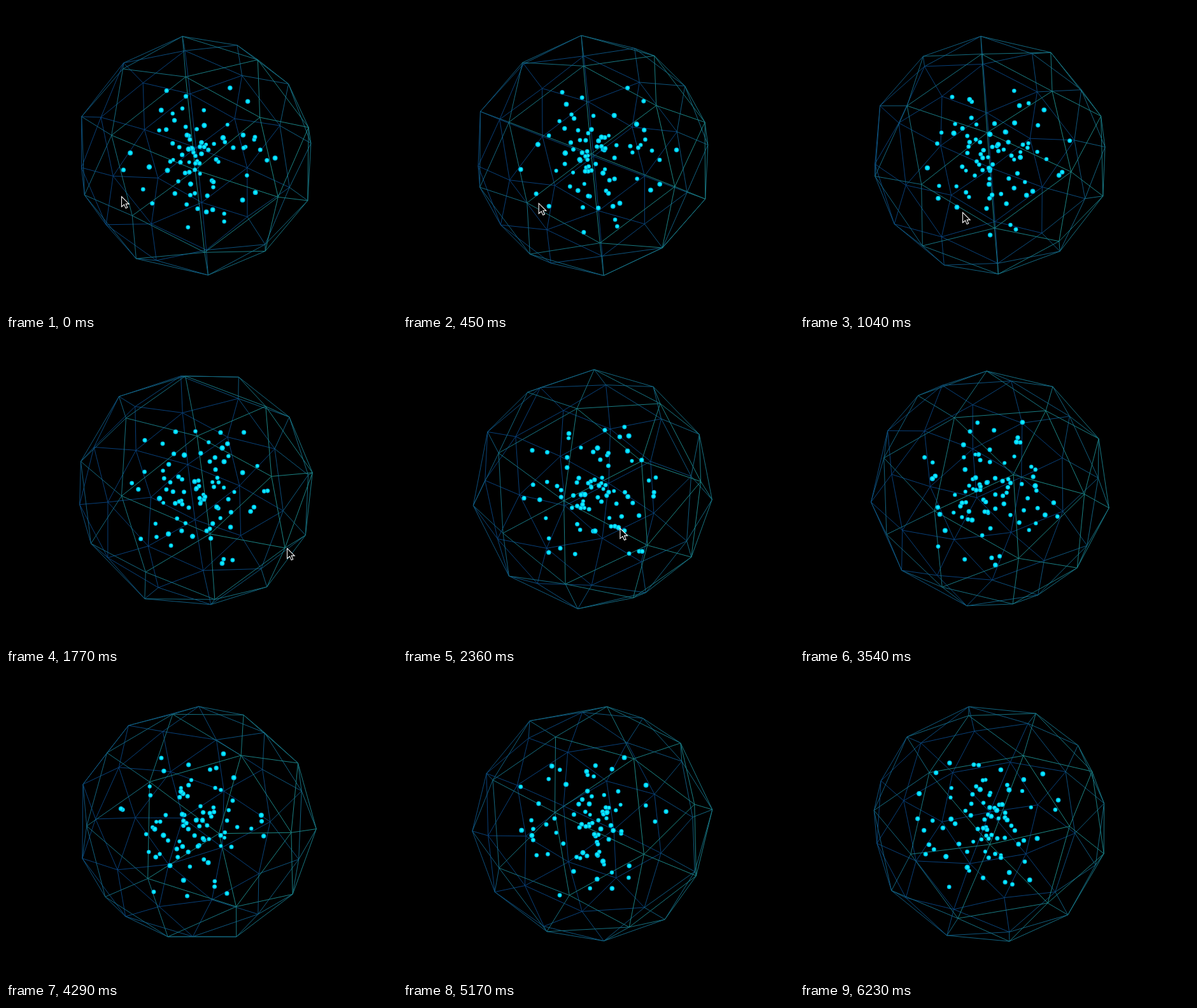
Animation of 614x481 px, one loop 6330 ms. Source, as an HTML page with a canvas:

```html
<!DOCTYPE html>
<html lang="en">
<head>
<meta charset="utf-8">
<title>Wire globe</title>
<style>
  html, body { margin: 0; width: 100%; height: 100%; overflow: hidden; background: #000; }
  canvas { display: block; }
</style>
</head>
<body>
<canvas id="stage" width="614" height="481"></canvas>
<script>
const ctx = document.getElementById('stage').getContext('2d');
const LOOP = 6330, STEP = 147.3, LAST = 42;
const CX = 298, CY = 235, DIST = 3.4, FOCAL = 616;
const PHI = (1 + Math.sqrt(5)) / 2;

// Globe keys: step, yaw, pitch, roll in degrees
const turns = [
  [0, -.2, -5.1, 37.8],
  [7, -.9, 8.1, 36],
  [12, 5.3, -16.1, 39.4],
  [19, -22, 5.1, 17.6],
  [29, -19.2, -20.7, 29.1],
  [35, 19.2, -11.2, 35.2],
  [42, 0, -7.4, 10.1]
];
// Pointer keys: step, x, y
const pointer = [[0, 181, 299], [7, 255, 324], [12, 441, 327], [19, 265, 272]];
const POINTER_END = 22;

const dot = (a, b) => a[0] * b[0] + a[1] * b[1] + a[2] * b[2];
const unit = v => v.map(c => c / Math.hypot(...v));
const mix = (a, b, k) => a.map((c, i) => c + (b[i] - c) * k);
const clamp = k => Math.min(1, Math.max(0, k));

function at(keys, n) {
  let i = 0;
  while (i < keys.length - 2 && n >= keys[i + 1][0]) i++;
  const [a, b] = [keys[i], keys[i + 1]];
  return mix(a, b, clamp((n - a[0]) / (b[0] - a[0]))).slice(1);
}

function swing(a, b, angle) {
  const c = Math.cos(angle), s = Math.sin(angle);
  return [a * c - b * s, a * s + b * c];
}

function rotate([x, y, z], yaw, pitch, roll) {
  [x, y] = swing(x, y, roll);
  [z, y] = swing(z, y, pitch);
  [z, x] = swing(z, x, yaw);
  return [x, y, z];
}

function project([x, y, z]) {
  const k = FOCAL / (DIST - z);
  return [CX + x * k, CY - y * k, k];
}

// Icosahedron split once: 12 corners and 30 edge midpoints
const corners = [];
for (const s of [-1, 1]) for (const q of [-PHI, PHI]) {
  corners.push(unit([0, s, q]), unit([s, q, 0]), unit([q, 0, s]));
}
// The side axis runs along x and the front axis along z
const verts = corners.map(([x, y, z]) => [y, -x, z]);
for (const a of verts.slice()) for (const b of verts.slice(0, 12)) {
  if (a < b && dot(a, b) > .4 && dot(a, b) < .5) verts.push(unit(mix(a, b, .5)));
}
const edges = [];
verts.forEach((a, i) => verts.slice(i + 1).forEach(b => {
  if (dot(a, b) > .8) edges.push([a, b]);
}));

let seed = 20;
function rand() {
  seed = (seed * 16807) % 2147483647;
  return seed / 2147483647;
}
const dots = Array.from({ length: 82 }, () => {
  const z = rand() * 2 - 1, a = rand() * Math.PI * 2;
  const r = .08 + .66 * rand() ** .8, s = Math.sqrt(1 - z * z);
  return [r * s * Math.cos(a), r * s * Math.sin(a), r * z];
});

function drawWire(n) {
  const turn = at(turns, n).map(d => d * Math.PI / 180);
  const lines = edges.map(([a, b]) => {
    const p = rotate(a, ...turn), q = rotate(b, ...turn);
    return { p, q, mid: mix(p, q, .5) };
  });
  lines.sort((a, b) => a.mid[2] - b.mid[2]);
  ctx.lineWidth = 1;
  for (const { p, q, mid } of lines) {
    const lit = clamp(.25 + .6 * mid[2] + .25 * mid[0]);
    ctx.strokeStyle = `rgb(${mix([8, 64, 122], [32, 148, 136], lit).map(Math.round)})`;
    ctx.beginPath();
    ctx.moveTo(...project(p).slice(0, 2));
    ctx.lineTo(...project(q).slice(0, 2));
    ctx.stroke();
  }
}

function drawDots(n) {
  const pts = dots.map(p => rotate(p, n * .08, n * .06, 0)).sort((a, b) => a[2] - b[2]);
  for (const p of pts) {
    const [x, y, k] = project(p), r = k * .0198;
    const fill = ctx.createRadialGradient(x + r * .15, y - r * .15, 0, x, y, r);
    fill.addColorStop(0, '#2cf6ff');
    fill.addColorStop(.55, '#00e6ff');
    fill.addColorStop(1, '#009fd0');
    ctx.fillStyle = fill;
    ctx.beginPath();
    ctx.arc(x, y, r, 0, Math.PI * 2);
    ctx.fill();
  }
}

const arrow = new Path2D('M0 0V16L4 12.6L6.6 18.4L9.2 17.3L6.7 11.6H11.6Z');

function drawPointer(n) {
  if (n > POINTER_END) return;
  const [x, y] = at(pointer, n);
  ctx.save();
  ctx.translate(x + .5, y + .5);
  ctx.fillStyle = '#000';
  ctx.fill(arrow);
  ctx.strokeStyle = '#fff';
  ctx.lineWidth = 1.1;
  ctx.stroke(arrow);
  ctx.restore();
}

function draw() {
  const n = Math.min(LAST, Math.floor((performance.now() % LOOP) / STEP));
  ctx.fillStyle = '#000';
  ctx.fillRect(0, 0, 614, 481);
  drawWire(n);
  drawDots(n);
  drawPointer(n);
  requestAnimationFrame(draw);
}
draw();
</script>
</body>
</html>
```
